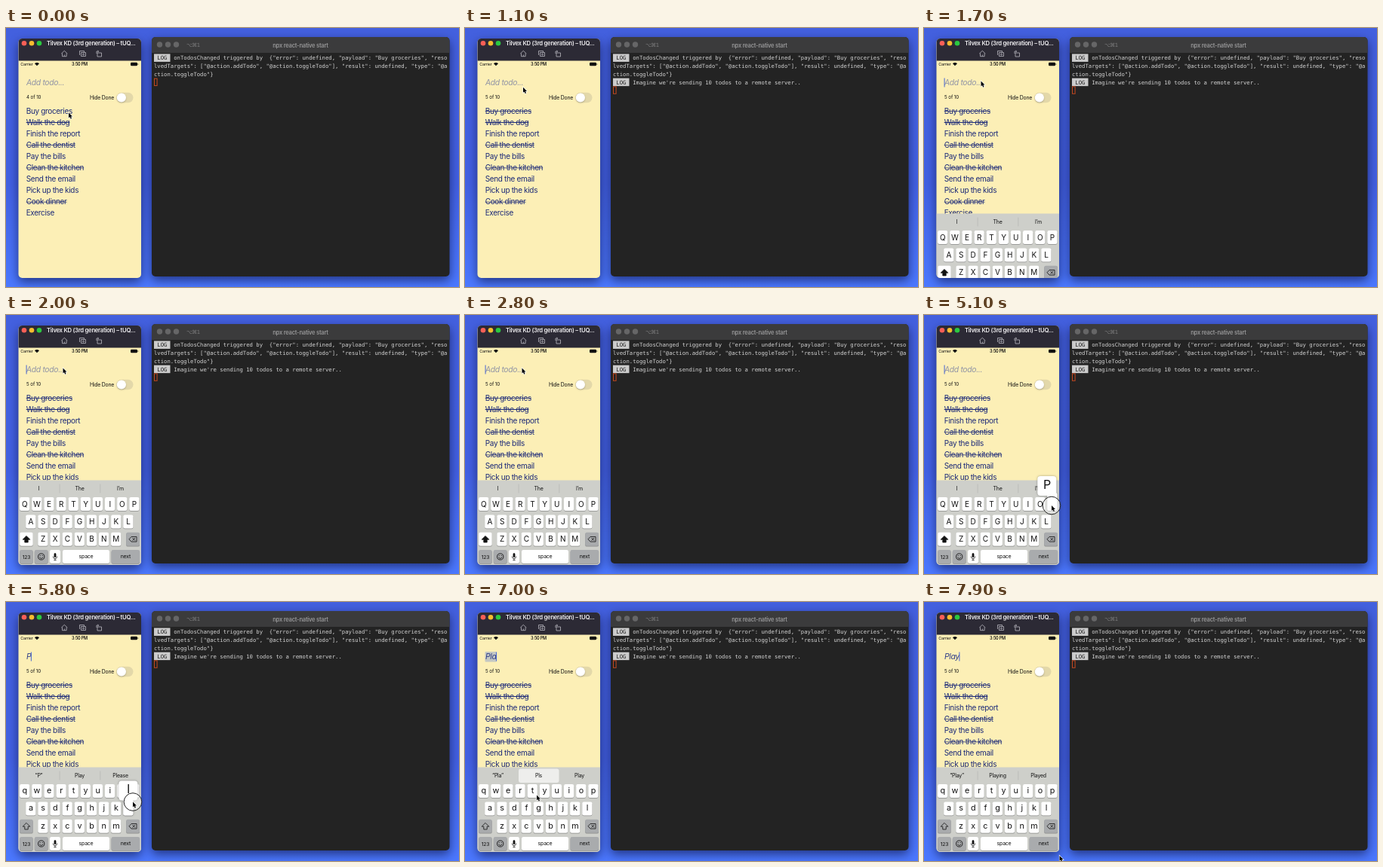
These frames come from a looping animation (600 by 344 pixels, 8000 ms). An HTML page with a canvas:

```html
<!DOCTYPE html>
<html lang="en">
<head>
<meta charset="utf-8">
<title>Todo app and log</title>
<style>
html, body { margin: 0; width: 100%; height: 100%; overflow: hidden; background: #4361e0; }
canvas { display: block; }
</style>
</head>
<body>
<canvas id="stage" width="600" height="344"></canvas>
<script>
const c = document.getElementById('stage').getContext('2d');
const SANS = 'Inter, "Liberation Sans", sans-serif';
const MONO = '"DejaVu Sans Mono", monospace';
const NAVY = '#1c2a78';
const LOOP = 8000, STEP = 100;

const TODOS = ['Buy groceries', 'Walk the dog', 'Finish the report', 'Call the dentist', 'Pay the bills',
  'Clean the kitchen', 'Send the email', 'Pick up the kids', 'Cook dinner', 'Exercise'];
const LOG = [
  ' LOG  onTodosChanged triggered by  {"error": undefined, "payload": "Buy groceries", "reso',
  'lvedTargets": ["@action.addTodo", "@action.toggleTodo"], "result": undefined, "type": "@a',
  'ction.toggleTodo"}',
  " LOG  Imagine we're sending 10 todos to a remote server.."
];

// Times of the hard changes
const TOGGLE = 200, SEND = 1100, FOCUS = 1530;
const TYPED = [
  { at: FOCUS, text: '', hints: ['I', 'The', 'I\u2019m'] },
  { at: 5150, text: 'P', hints: ['\u201cP\u201d', 'Play', 'Please'] },
  { at: 5850, text: 'Pl', hints: ['\u201cPl\u201d', 'Play', 'Please'] },
  { at: 6400, text: 'Pla', hints: ['\u201cPla\u201d', 'Pls', 'Play'], fix: true },
  { at: 7250, text: 'Play', hints: ['\u201cPlay\u201d', 'Playing', 'Played'] }
];
const PRESSES = [[5100, 5300, 'p'], [5700, 5900, 'l'], [6350, 6500, 'a'], [7200, 7350, 'y']];
const TAPS = [[1450, 1550], ...PRESSES];
// Pointer stops: time, x, y
const POINTER = [[0, 83, 112.5], [600, 83, 112.5], [1300, 75.5, 70.5], [4600, 75.5, 70.5], [5050, 169, 253],
  [5350, 169, 253], [5700, 168, 265.5], [5900, 168, 265.5], [6300, 33, 275], [6550, 33, 275],
  [7000, 95, 256.5], [7200, 105, 252], [7350, 105, 252], [7900, 179.5, 337]];

const active = (list, t) => list.find(([from, to]) => t >= from && t < to);

function text(s, x, y, size, color, { align = 'left', style = '', family = SANS, track = -0.034 } = {}) {
  c.font = `${style} ${size}px ${family}`;
  c.letterSpacing = size * track + 'px';
  c.textAlign = align;
  c.fillStyle = color;
  c.fillText(s, x, y);
  return c.measureText(s).width;
}

function box(x, y, w, h, r, color) {
  c.fillStyle = color;
  c.beginPath();
  c.roundRect(x, y, w, h, r);
  c.fill();
}

function dot(x, y, r, color) {
  c.fillStyle = color;
  c.beginPath();
  c.arc(x, y, r, 0, 7);
  c.fill();
}

function line(path, color, width = 0.8) {
  c.strokeStyle = color;
  c.lineWidth = width;
  c.stroke(new Path2D(path));
}

function panel(x, y, w, h, color) {
  c.save();
  c.shadowColor = 'rgba(0,0,30,.55)';
  c.shadowBlur = 14;
  c.shadowOffsetY = 5;
  box(x, y, w, h, 5, color);
  c.restore();
}

function backdrop() {
  const g = c.createLinearGradient(0, 0, 0, 344);
  g.addColorStop(0, '#4360de');
  g.addColorStop(0.6, '#4260e2');
  g.addColorStop(1, '#4b78ff');
  c.fillStyle = g;
  c.fillRect(0, 0, 600, 344);
}

function terminal(t) {
  panel(193, 12, 394.5, 318, '#232323');
  box(193, 12, 394.5, 21, [5, 5, 0, 0], '#3b3b3c');
  for (const x of [203.5, 214.5, 225.5]) dot(x, 22, 3.7, '#666667');
  text('\u2325\u23181', 239, 25, 7, '#7c7c7d', { family: '"DejaVu Sans", sans-serif', track: -0.1 });
  text('npx react-native start', 390, 25.7, 7.6, '#949495', { align: 'center', style: '600' });

  const rows = t < SEND ? 3 : 4;
  for (let i = 0; i < rows; i++) {
    const y = 42.4 + i * 10.75;
    text(LOG[i].replace(' LOG ', '     '), 196, y, 7.26, '#d2d2d2', { family: MONO, track: 0 });
    if (LOG[i].startsWith(' LOG')) {
      box(196, y - 8, 21.5, 10.5, 0, '#cbcbcb');
      text(' LOG', 196, y, 7.26, '#222', { family: MONO, track: 0 });
    }
  }
  c.strokeStyle = '#c4481f';
  c.lineWidth = 1;
  c.strokeRect(196.5, 34.9 + rows * 10.75, 3.6, 9.4);
}

function titleBar() {
  box(16.5, 14, 162.5, 29.5, 0, '#2c2a35');
  dot(24, 20.3, 3.3, '#f95f57');
  dot(34, 20.3, 3.3, '#f8bc2f');
  dot(44, 20.3, 3.3, '#2bc840');
  text('Tilvex KD (3rd generation) \u2013 tUQ...', 54, 23.3, 7.7, '#f0eff2', { style: '600' });
  const gray = '#b9b8bf';
  line('M73.3 34 L77.3 30.3 L81.3 34 M74.5 33.5 V37.7 H80.1 V33.5 M77.3 35.5 V37.7', gray);
  line('M97.5 36 V30.5 H103.5 V32 M99.5 32.5 H105.5 V37.5 H99.5 Z M101.5 35 a1 1 0 1 0 2 0 a1 1 0 1 0 -2 0', gray);
  line('M121 33 H126.5 V38 H121 Z M120 34 V31 H122.5 M121.5 30 L122.8 31 L121.5 32', gray);
}

function statusBar() {
  text('Carrier', 19.3, 50, 5.4, '#111');
  text('3:50 PM', 97.5, 50, 5.5, '#111', { align: 'center', style: '600' });
  c.fillStyle = '#111';
  c.beginPath();
  c.moveTo(41, 50.2);
  c.arc(41, 50.2, 4.3, -2.36, -0.78);
  c.fill();
  box(165, 45.8, 9, 4.4, 1.2, '#111');
  box(174.5, 47.2, 0.8, 1.6, 0.4, '#111');
}

function todoList(t, entry) {
  const caretBase = 27;
  let w = 0;
  if (entry && entry.text) {
    if (entry.fix) box(26.5, 66, 15.5, 13.5, 1, '#c3c7c3');
    w = text(entry.text, 27, 76, 10.4, '#2f3d87', { style: 'italic' });
  } else {
    text('Add todo...', 27, 76.2, 10.4, '#9295a5', { style: 'italic' });
  }
  if (entry && (t - entry.at) % 1000 < 700) box(caretBase + w - 0.4, 66.5, 1, 12, 0, '#4664d2');

  const toggled = t >= TOGGLE;
  text(`${toggled ? 5 : 4} of 10`, 27, 94.4, 6.2, '#111', { track: -0.01 });
  text('Hide Done', 111, 94.8, 6.9, '#111');
  box(146, 85.8, 22.5, 13.4, 6.7, '#e3d8a9');
  c.save();
  c.shadowColor = 'rgba(0,0,0,.25)';
  c.shadowBlur = 2;
  c.shadowOffsetY = 1;
  dot(152.9, 92.5, 6.1, '#fff');
  c.restore();

  TODOS.forEach((s, i) => {
    const y = 113.5 + i * 15.1;
    const width = text(s, 26.7, y, 10, NAVY);
    const done = i === 0 ? toggled : [1, 3, 5, 8].includes(i);
    if (done) box(26.7, y - 3.6, width, 0.9, 0, NAVY);
  });
}

function key(x, y, w, color = '#fff') {
  box(x, y - 8.2, w, 18, 2.2, '#8b8c8a');
  box(x, y - 9, w, 18, 2.2, color);
}

function keyboard(t, entry) {
  const p = Math.min(1, (t - FOCUS) / 450);
  const upper = !entry.text;
  const pressed = active(PRESSES, t);
  const gray = '#a9abad', ink = '#111';
  c.save();
  c.translate(0, 112 * (1 - p) ** 3);
  box(16.5, 219.5, 162.5, 113, 0, '#cecfca');

  if (entry.fix) box(71, 221.5, 53.5, 18.5, 3, '#eeeeec');
  else for (const x of [70.7, 124.5]) box(x, 224.5, 0.7, 12, 0, '#b5b6b2');
  entry.hints.forEach((s, i) => text(s, 43.5 + i * 54, 232.8, 7, ink, { align: 'center' }));

  let bubble;
  ['qwertyuiop', 'asdfghjkl', 'zxcvbnm'].forEach((row, r) => {
    const y = 251 + r * 23.4;
    [...row].forEach((ch, i) => {
      const x = [24.7, 32.8, 48.9][r] + i * 16.13;
      const label = upper ? ch.toUpperCase() : ch;
      key(x - 6.6, y, 13.2);
      text(label, x, y + (upper ? 3.6 : 3), upper ? 10 : 10.8, ink, { align: 'center' });
      if (pressed && pressed[2] === ch) bubble = { x, y, label };
    });
  });

  key(18.2, 297.8, 17.5, upper ? '#fff' : gray);
  const arrow = 'M27 293.4 L31.8 298.2 H29.2 V302 H24.8 V298.2 H22.2 Z';
  c.fillStyle = ink;
  if (upper) c.fill(new Path2D(arrow));
  line(arrow, ink);
  key(159.2, 297.8, 17.8, gray);
  line('M163 297.8 L166 294.5 H173 V301.1 H166 Z M167.6 296 L171 299.6 M171 296 L167.6 299.6', ink);

  key(18.2, 321, 17.5, gray);
  text('123', 27, 323.5, 6.8, ink, { align: 'center' });
  key(37.8, 321, 17.8, gray);
  line('M42.6 321 a4.1 4.1 0 1 0 8.2 0 a4.1 4.1 0 1 0 -8.2 0 M44.3 322 q2.4 3 4.8 0 M45.2 319 v1.2 M48.2 319 v1.2', ink, 0.9);
  key(58, 321, 14);
  box(63.6, 316.3, 2.8, 5.8, 1.4, ink);
  line('M62.3 320.5 q0 3.2 2.7 3.2 t2.7 -3.2 M65 323.7 v2 M63.3 325.7 h3.4', ink, 0.7);
  key(75, 321, 62);
  text('space', 106, 323.3, 7, ink, { align: 'center' });
  key(139.6, 321, 37.5, gray);
  text('next', 158.4, 323.3, 7, ink, { align: 'center' });

  if (bubble) {
    const { x, y, label } = bubble;
    const left = Math.max(18, Math.min(150.3, x - 12.5));
    c.save();
    c.shadowColor = 'rgba(0,0,0,.35)';
    c.shadowBlur = 3;
    c.fillStyle = '#fff';
    c.beginPath();
    c.roundRect(left, y - 37, 25, 26, 4);
    c.roundRect(x - 6.6, y - 15, 13.2, 24, 2.2);
    c.fill();
    c.restore();
    text(label, left + 12.5, y - 20, 16, ink, { align: 'center' });
  }
  c.restore();
}

function phone(t) {
  const entry = TYPED.findLast(e => t >= e.at);
  panel(16.5, 14, 162.5, 318, '#fcefb6');
  c.save();
  c.beginPath();
  c.roundRect(16.5, 14, 162.5, 318, 5);
  c.clip();
  titleBar();
  statusBar();
  todoList(t, entry);
  if (entry) keyboard(t, entry);
  c.restore();
}

function pointer(t) {
  const next = POINTER.findIndex(s => s[0] > t);
  const b = POINTER.at(next), a = next > 0 ? POINTER[next - 1] : b;
  const k = b === a ? 0 : (t - a[0]) / (b[0] - a[0]);
  const e = k * k * (3 - 2 * k);
  const x = a[1] + (b[1] - a[1]) * e, y = a[2] + (b[2] - a[2]) * e;
  if (active(TAPS, t)) {
    dot(x, y, 11.8, 'rgba(255,255,255,.45)');
    c.strokeStyle = '#222';
    c.lineWidth = 1;
    c.stroke();
  }
  c.save();
  c.translate(x, y);
  const arrow = new Path2D('M0 0 V7 L1.6 5.6 L2.7 8.2 L4 7.6 L2.9 5.1 H5 Z');
  c.strokeStyle = '#fff';
  c.lineWidth = 1.2;
  c.stroke(arrow);
  c.fillStyle = '#000';
  c.fill(arrow);
  c.restore();
}

const start = performance.now();
function draw() {
  const t = Math.floor((performance.now() - start) % LOOP / STEP) * STEP;
  backdrop();
  terminal(t);
  phone(t);
  pointer(t);
  requestAnimationFrame(draw);
}
draw();
</script>
</body>
</html>
```
